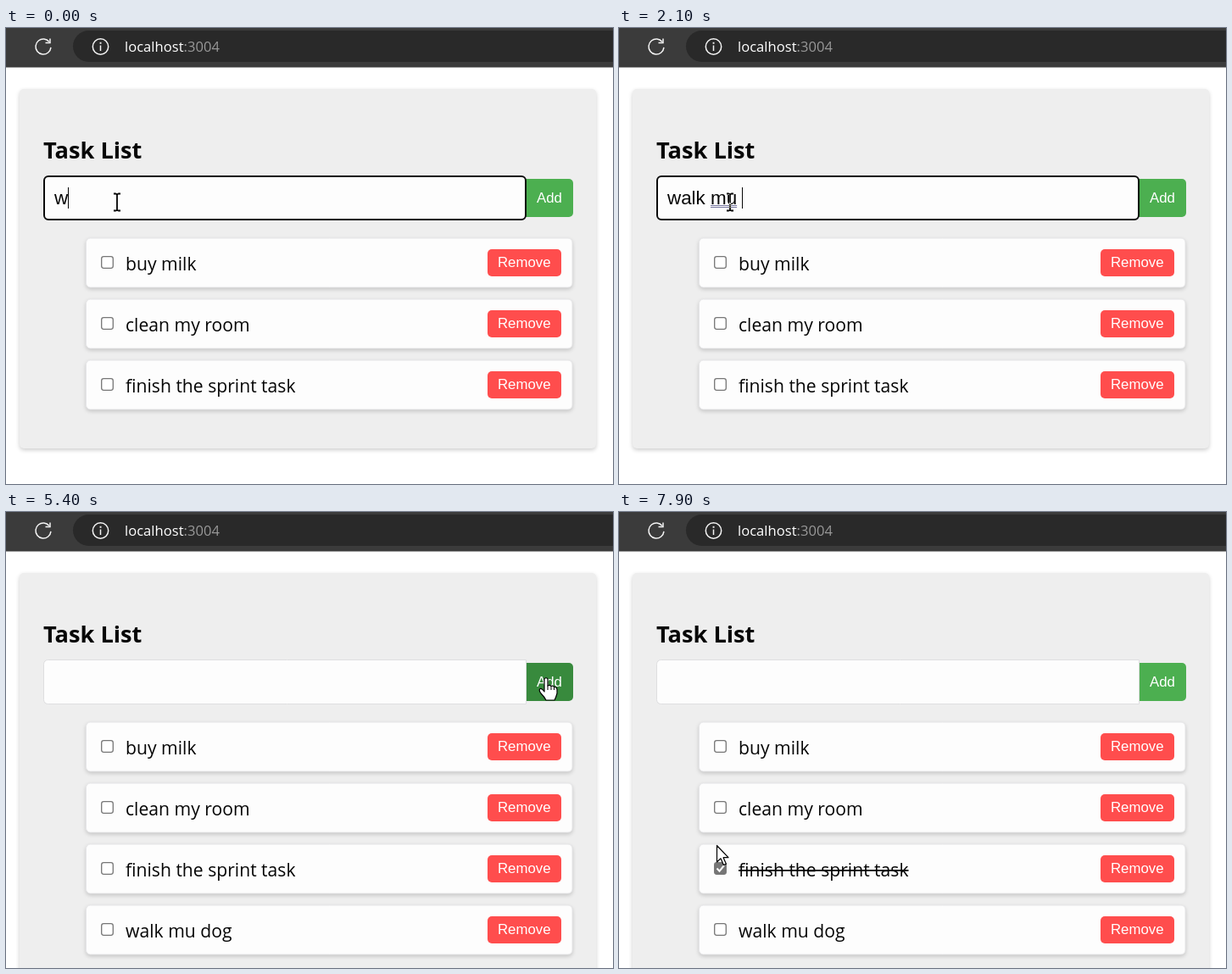
Animation, 716 px wide and 538 px high, one loop 8 s. Source, as an HTML page with a canvas:

```html
<!DOCTYPE html>
<html lang="en">
<head>
<meta charset="utf-8">
<title>Task List</title>
<style>
html, body { margin: 0; width: 100%; height: 100%; overflow: hidden; background: #fff; }
canvas { display: block; }
</style>
</head>
<body>
<canvas id="stage" width="716" height="538"></canvas>
<script>
const ctx = document.getElementById('stage').getContext('2d');
const LOOP = 8000, STEP = 100;
const UI = '"Open Sans", "Noto Sans", sans-serif';
const ARIAL = '"Liberation Sans", Arial, sans-serif';
const PAPER = '#fdfdfd', INK = '#060606', LIGHT = '#f4f4f4', GREY = '#767676';

const TEXT = 'walk mu dog';
const KEYS = [0, 100, 600, 800, 1000, 1500, 1700, 2000, 2300, 2500, 2900];
const BLUR = 4200, ADDED = 4300, CHECKED = 7000;
const ITEMS = ['buy milk', 'clean my room', 'finish the sprint task'];

// time, x, y
const MOVES = [
  [0, 131, 205], [3100, 131, 205], [3800, 631, 162], [4000, 637, 196],
  [5400, 637, 196], [6200, 224, 437], [6700, 117, 418], [7200, 117, 418], [7900, 115, 393], [8000, 115, 393]
];

const ARROW = new Path2D('M.5.5V20L5 15.8L8.4 23.5L11.4 22.2L8.1 14.7H14Z');
const HAND = new Path2D('M-2 1Q0-1.5 2 1V9Q4 7.5 6 9.5Q8.5 8.5 9.5 10.5Q12.5 10 13 13V18Q12 22 10 26H0Q-2 22-6 18Q-9 14-7 12.5Q-5 12-2 16Z');
const BEAM = new Path2D('M-4-9.5H-1.5L0-8.5L1.5-9.5H4M-4 10.5H-1.5L0 9.5L1.5 10.5H4M0-8.5V9.5');

function box(x, y, w, h, r, fill, stroke, width = 1) {
  ctx.beginPath();
  ctx.roundRect(x, y, w, h, r);
  if (fill) { ctx.fillStyle = fill; ctx.fill(); }
  if (stroke) { ctx.strokeStyle = stroke; ctx.lineWidth = width; ctx.stroke(); }
}

function card(x, y, w, h, fill) {
  ctx.save();
  ctx.shadowColor = 'rgba(0, 0, 0, 0.2)';
  ctx.shadowBlur = 5;
  ctx.shadowOffsetY = 2;
  box(x, y, w, h, 5, fill);
  ctx.restore();
}

function label(str, x, y, font, color) {
  ctx.font = font;
  ctx.fillStyle = color;
  ctx.fillText(str, x, y);
  return ctx.measureText(str).width;
}

function line(points, color, width) {
  ctx.beginPath();
  points.forEach(([x, y]) => ctx.lineTo(x, y));
  ctx.strokeStyle = color;
  ctx.lineWidth = width;
  ctx.stroke();
}

function ring(x, y, r, from, to) {
  ctx.beginPath();
  ctx.arc(x, y, r, from, to);
  ctx.strokeStyle = LIGHT;
  ctx.lineWidth = 1.5;
  ctx.stroke();
}

function header() {
  ctx.fillStyle = '#3b3b3b';
  ctx.fillRect(0, 0, 716, 46.5);
  box(79, 3, 700, 37, 18.5, '#292929');
  ring(44, 22, 9, 0.1, Math.PI * 2 - 0.7);
  line([[52, 12.5], [52, 17.5], [46.5, 17.5]], LIGHT, 1.5);
  ring(111.5, 22, 9.2, 0, Math.PI * 2);
  line([[111.5, 20.5], [111.5, 27]], LIGHT, 1.5);
  ctx.fillStyle = LIGHT;
  ctx.fillRect(110.6, 16.8, 1.9, 1.9);
  const font = '16.6px ' + UI;
  const w = label('localhost', 140, 28, font, '#fff');
  label(':3004', 140 + w, 28, font, '#989898');
}

function item(name, i, done) {
  const y = 248 + i * 72;
  card(94.5, y, 573.5, 58, PAPER);
  box(94.5, y, 573.5, 58, 5, PAPER, '#e6e6e8');
  box(112.7, y + 21.7, 13.6, 13.6, 2.5, done ? GREY : '#fff', GREY, 1.3);
  if (done) line([[115.5, y + 28.5], [118.5, y + 31.7], [124, y + 25]], '#fff', 2);
  const w = label(name, 141, y + 38, '21.15px ' + UI, INK);
  if (done) ctx.fillRect(141, y + 30, w, 1.8);
  box(568, y + 13, 87, 32, 5, '#ff4d4d');
  label('Remove', 580, y + 34, '16.8px ' + ARIAL, '#fff');
}

function field(t) {
  if (t >= BLUR) {
    box(44.5, 174.5, 569, 52, [5, 0, 0, 5], PAPER, '#dedee0');
  } else {
    box(45, 175, 568, 51, 5, PAPER, '#0c0c0c', 2);
  }
  if (t >= ADDED) return;
  const count = KEYS.filter(k => k <= t).length;
  const w = label(TEXT.slice(0, count), 57, 208, '22.4px ' + ARIAL, INK);
  if (count > 7) {
    const x = 57 + ctx.measureText('walk ').width;
    const mark = ctx.measureText('mu').width;
    ctx.fillStyle = '#7777a0';
    ctx.fillRect(x, 209, mark, 1);
    ctx.fillRect(x, 211, mark, 1);
  }
  const idle = t - KEYS[count - 1];
  if (t < BLUR && Math.floor(idle / 500) % 2 === 0) {
    ctx.fillStyle = INK;
    ctx.fillRect(Math.round(57 + w - 0.5), 188, 1, 25);
  }
}

function slope(i, axis) {
  const [a, b] = [MOVES[i], MOVES[i + 1]];
  return a && b ? (b[axis] - a[axis]) / (b[0] - a[0]) : 0;
}

// Speed through a point: rests and turning points stop, the rest flows on.
function speed(i, axis) {
  const a = slope(i - 1, axis), b = slope(i, axis);
  return a * b > 0 ? 2 * a * b / (a + b) : 0;
}

function pointer(t) {
  const i = MOVES.findIndex(m => m[0] > t) - 1;
  const a = MOVES[i], b = MOVES[i + 1];
  const d = b[0] - a[0], p = (t - a[0]) / d, q = 1 - p;
  return [1, 2].map(k =>
    a[k] + (b[k] - a[k]) * p * p * (3 - 2 * p) +
    d * p * q * (q * speed(i, k) - p * speed(i + 1, k)));
}

const inside = (x, y, l, t, r, b) => x >= l && x < r && y >= t && y < b;

function cursor(x, y, overAdd) {
  ctx.save();
  ctx.translate(Math.round(x), Math.round(y));
  ctx.lineJoin = 'round';
  if (inside(x, y, 44, 174, 613, 227)) {
    ctx.globalCompositeOperation = 'difference';
    ctx.strokeStyle = '#fff';
    ctx.lineWidth = 1.8;
    ctx.stroke(BEAM);
  } else {
    const shape = overAdd ? HAND : ARROW;
    ctx.fillStyle = '#fff';
    ctx.fill(shape);
    ctx.strokeStyle = '#000';
    ctx.lineWidth = 1.2;
    ctx.stroke(shape);
    if (overAdd) {
      line([[2, 9], [2, 14]], '#000', 1);
      line([[6, 10], [6, 14]], '#000', 1);
      line([[9.5, 11], [9.5, 14]], '#000', 1);
    }
  }
  ctx.restore();
}

function draw(t) {
  const [x, y] = pointer(t);
  const overAdd = inside(x, y, 613, 178, 669, 223);
  const items = t >= ADDED ? [...ITEMS, TEXT] : ITEMS;

  ctx.fillStyle = '#fff';
  ctx.fillRect(0, 0, 716, 538);
  header();
  card(16, 72, 680, 208 + items.length * 72, '#eeeeee');
  label('Task List', 44, 154, 'bold 27.2px ' + UI, INK);
  box(613, 178, 56, 45, [0, 5, 5, 0], overAdd ? '#388a3d' : '#4caf50');
  label('Add', 626, 206, '16.8px ' + ARIAL, '#fff');
  field(t);
  items.forEach((name, i) => item(name, i, i === 2 && t >= CHECKED));
  cursor(x, y, overAdd);
}

const start = performance.now();
function tick() {
  const t = (performance.now() - start) % LOOP;
  draw(Math.floor(t / STEP) * STEP);
  requestAnimationFrame(tick);
}
tick();
</script>
</body>
</html>
```
